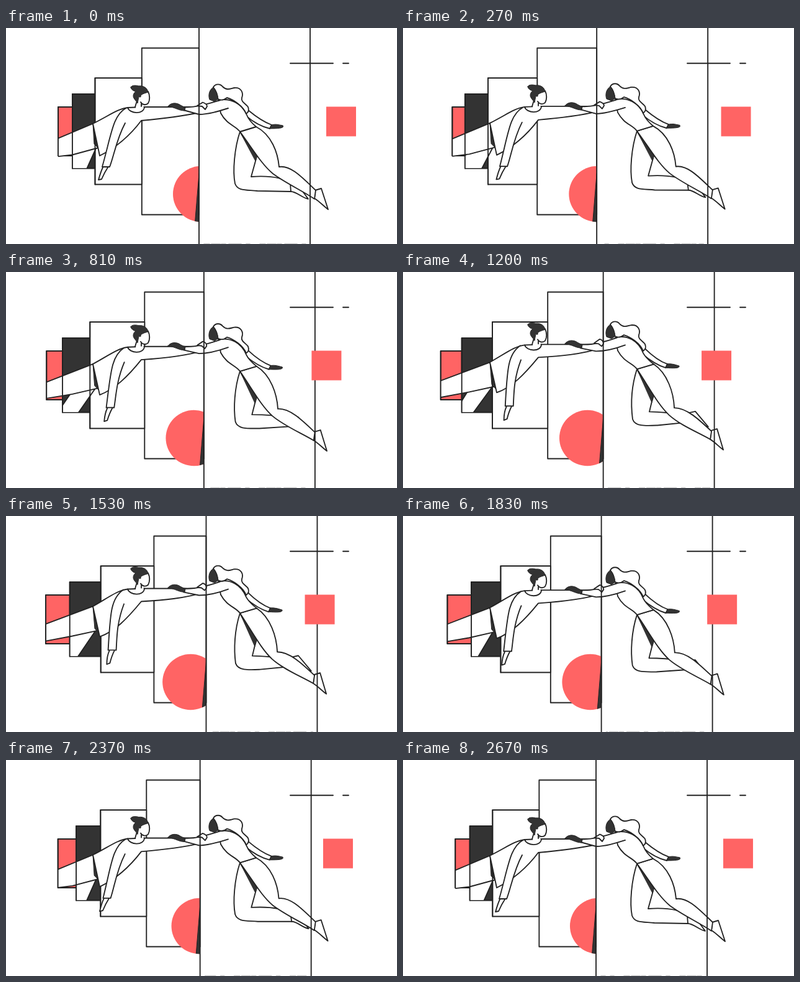
Animation of 630 by 350 pixels, one loop 2.7 s. Source, as an HTML page:

```html
<!DOCTYPE html>
<html lang="en">
<head>
<meta charset="utf-8">
<title>Reaching through panels</title>
<style>
  html, body { margin: 0; width: 100%; height: 100%; overflow: hidden; background: #fff; }
  svg { display: block; width: 630px; height: 350px; }
  path, rect { stroke-linejoin: round; stroke-linecap: round; }
  .ink { fill: none; stroke: #222; stroke-width: 1.85; }
  .body { fill: #fff; stroke: #222; stroke-width: 1.85; }
  .skin { fill: #fff; }
  .dark { fill: #333; stroke: #222; stroke-width: 1; }
  .black { fill: #333; stroke: #222; stroke-width: 1.85; }
  .redBox { fill: #ff6464; stroke: #222; stroke-width: 1.85; }
  .red { fill: #ff6464; }
  .crumbs { fill: none; stroke: #ccc; stroke-width: 1.5; stroke-dasharray: 9 3 14 2 7 5 20 8 6 16; }
</style>
</head>
<body>
<svg viewBox="0 0 630 350">
  <defs>
    <filter id="rough" filterUnits="userSpaceOnUse" x="0" y="0" width="630" height="350" color-interpolation-filters="sRGB">
      <feTurbulence type="fractalNoise" baseFrequency=".08" numOctaves="1" seed="4"/>
      <feDisplacementMap in="SourceGraphic" scale="1.5" xChannelSelector="R" yChannelSelector="G"/>
    </filter>
    <clipPath id="legClip"><rect id="legBox" y="0" width="400" height="227"/></clipPath>
    <clipPath id="farClip"><rect id="farBox" y="0" width="400" height="227"/></clipPath>
    <clipPath id="leftClip"><rect id="leftBox" x="0" y="0" height="350"/></clipPath>
    <clipPath id="discClip"><circle id="discHole" cy="269" r="45.3"/></clipPath>
  </defs>
  <g filter="url(#rough)">
    <rect id="box4" class="redBox" y="128" height="79"/>
    <rect id="box3" class="black" y="107" height="120.5"/>
    <rect id="box1" class="body" y="32.5" height="270"/>
    <rect id="box2" class="body" y="81" height="172.5"/>
    <g clip-path="url(#leftClip)">
      <circle id="disc" class="red" cy="269" r="45.3"/>
      <g clip-path="url(#discClip)"><path id="wedge" class="dark"/></g>
    </g>
    <path class="ink" d="M458 57.2H527M543 57.2H552"/>
    <g clip-path="url(#farClip)"><path id="farLeg" class="body"/></g>
    <g id="legs" clip-path="url(#legClip)"></g>
    <path id="edges" class="ink"/>
    <g id="people"></g>
    <path id="posts" class="ink"/>
    <rect id="square" class="red" y="127.5" width="48" height="48"/>
    <path id="crumbs" class="crumbs"/>
  </g>
</svg>
<script>
const LOOP = 2700;
const $ = id => document.getElementById(id);
const set = (id, attrs) => {
  for (const k in attrs) $(id).setAttribute(k, attrs[k]);
};
const morphs = [];

// Two poses of one path; a number as second pose lifts the first by that much.
function shape(parent, cls, low, high) {
  const el = document.createElementNS('http://www.w3.org/2000/svg', 'path');
  el.setAttribute('class', cls);
  $(parent).append(el);
  const a = low.match(/[A-Z]|-?[\d.]+/g);
  let odd = true;
  const b = typeof high === 'string' ? high.match(/[A-Z]|-?[\d.]+/g)
    : a.map(v => isNaN(v) ? v : (odd = !odd) ? +v - high : v);
  morphs.push(s => el.setAttribute('d',
    a.map((v, i) => isNaN(v) ? v : (+v + (b[i] - v) * s).toFixed(2)).join(' ')));
}
const person = (...args) => shape('people', ...args);

// Man: near leg and hip
shape('legs', 'body', 'M140 155 L60 189 L60 211 L107 205.5 L149 194',
  'M140 146 L60 176 L60 203 L107 194 L149 185');
shape('legs', 'dark', 'M140 155 L142 188 L148 194 Z', 'M140 146 L143 182 L150 190 Z');

// Man: torso and reaching arm
person('body',
  'M196 129 C180 131 166 142 140 155 L151 207 C175 195 197 178 218 150 C252 147 284 143 311 137 L311 128 L222 128 Z',
  'M196 118 C180 120 166 131 140 146 L151 195 C175 187 195 166 218 138 C252 136 290 133 318 123 L318 117 L222 117 Z');
person('body',
  'M193 130 C172 142 170 172 155 225 L167 225 C174 207 178 180 192 154',
  'M189 119 C168 133 168 160 165 217 L178 217 C179 198 178 174 190 142');
person('body', 'M156 226 C153 232 151 239 149 246 L154 245 C157 238 160 232 164 226',
  'M167 218 C164 224 163 232 163 240 L168 238 C170 230 172 224 175 218');

// Man: head
person('skin', 'M211 108 L209 130 C212 137 220 134 222 128 L218 124 C225 127 231 123 231 114 L228 103 Z', 11);
person('ink', 'M229 103 C232 109 232 117 229 122 C225 126 219 124 217 120 M218 123 L218 127 M211 118 L208 128', 11);
person('ink', 'M196 129 C199 139 222 141 223 128', 11);
person('dark',
  'M201 96 C203 92 210 93 214 94 C221 93 228 97 229 104 C226 105 221 106 217 109 C218 112 216 113 214 111 L212 122 C211 119 205 115 205 110 C205 107 207 104 209 103 C205 102 201 99 201 96 Z', 11);

// Woman: trailing arm
person('body', 'M390 133 C402 143 414 152 428 157 L425 163 C412 160 398 152 386 142',
  'M389 123 C400 134 412 144 426 149 L423 155 C410 151 398 143 386 133');
person('dark', 'M428 157 C435 155 440 157 446 158 C449 162 441 163 425 163 Z',
  'M426 148.5 C433 148 439 150 445 152 C446 156 437 156 423 155 Z');

// Woman: far leg and foot
person('body',
  'M377 168 C368 195 365 232 369 252 C373 264 385 262 405 264 L459 265 C468 265 478 276 487 277 L470 254 L458 252 C446 242 425 239 395 241 L403 212 Z',
  'M377 157 C368 185 367 215 370 238 C374 250 390 249 410 248 L468 242 C474 240 480 248 492 250 L471 225 L459 228 C446 230 424 227 397 226 L402 205 Z');
person('ink', 'M458 252 L459 265', 'M460 228 L468 242');

// Woman: near leg and foot
person('body', 'M498 263 L508 260 L519 294 C511 288 505 281 497 276 Z',
  'M496 257 L506 254 L516 288 C509 283 503 276 495 271 Z');
person('dark', 'M378 170 L406 205 L402 215 Z', 'M378 159 L405 198 L401 211 Z');
person('body',
  'M377 168 L403 160 C428 173 438 202 440 225 C459 222 477 242 499 263 L497 277 C478 264 450 251 430 236 C412 221 399 198 377 168 Z',
  'M377 157 L404 149 C426 164 436 195 437 220 C457 220 477 239 497 258 L495 271 C476 260 448 249 429 232 C411 215 398 189 377 157 Z');

// Woman: torso, reaching arm and hair
person('body',
  'M342 117 C362 113 380 122 388 141 C391 149 396 154 403 160 L377 168 C370 158 356 157 346 138 Z',
  'M342 106 C362 101 379 111 387 131 C391 139 398 144 404 149 L377 157 C370 147 356 146 346 127 Z');
person('skin',
  'M286 128 C305 130 328 122 347 117 L358 130 C342 135 326 140 311 140 L286 133 Z',
  'M286 117 C305 119 328 112 347 106 L358 118 C342 124 326 128 311 128 L286 123 Z');
person('ink',
  'M286 128 C305 130 328 122 345 117 M358 130 C342 135 326 140 311 140 L286 133',
  'M286 117 C305 119 328 112 345 106 M358 118 C342 124 326 128 311 128 L286 123');
person('body',
  'M334 96 C338 89 346 91 349 95 C356 102 362 98 368 97 C379 96 383 105 380 113 C378 120 387 123 390 128 C392 133 390 137 387 139 C382 126 366 116 356 113 C350 118 345 117 341 115 C341 109 339 102 334 96 Z', 11.3);
person('dark', 'M334 96 C326 101 326 111 328 116 L336 119 L342 115 C341 109 339 102 334 96 Z', 11.3);

// Joined hands
person('dark', 'M261 127 C266 120 276 121 281 125 L289 129 L288 134 C278 134 274 129 261 127 Z', 11.2);
person('body', 'M308 126 L317 120.5 C321 122 324 124 324 127 L321 132 L316 127 Z',
  'M308 115 L317 108.5 C321 109 323 113 323 116 L320 120 L315 116 Z');

function draw(now) {
  const angle = now % LOOP / LOOP * 2 * Math.PI;
  const sway = (mid, amp, lag) => mid - amp * Math.cos(angle - lag * Math.PI / 180);
  const x1 = sway(227.5, 11.3, 40), x2 = sway(145.8, 12, 79);
  const x3 = sway(102.5, 11.5, 113), x4 = sway(72.7, 12, 160);
  const post = sway(317, 6, 0), disc = sway(305.5, -8.8, 0);
  const knee = sway(122, 8.7, 160), s = sway(.5, .5, 0);

  set('box1', { x: x1, width: post - x1 });
  set('box2', { x: x2, width: x1 - x2 });
  set('box3', { x: x3, width: x2 - x3 });
  set('box4', { x: x4, width: x3 - x4 });
  set('legBox', { x: x4 });
  set('farBox', { x: x3 });
  set('leftBox', { width: post });
  set('disc', { cx: disc });
  set('discHole', { cx: disc });
  set('square', { x: sway(498, -18, 0) });
  set('wedge', { d: `M${post} 236L${post - 6.5} 315H${post}Z` });
  set('farLeg', { d: `M83 228L${115 - 4 * s} ${190 - 8 * s}L148 ${188 - 8 * s}L${knee} 228` });
  set('edges', { d: `M${x4} 128V207M${x3} 107V227.5M${x2} 81V253.5` });
  set('posts', { d: `M${post} 0V350M${post + 179} 0V350` });
  const step = Math.floor(now % LOOP / 30);
  set('crumbs', { d: `M${post + 8} 349.5H${post + 172}`, 'stroke-dashoffset': step * 37 % 90 });
  for (const m of morphs) m(s);
}

const start = performance.now();
function tick() {
  draw(performance.now() - start);
  requestAnimationFrame(tick);
}
tick();
</script>
</body>
</html>
```
